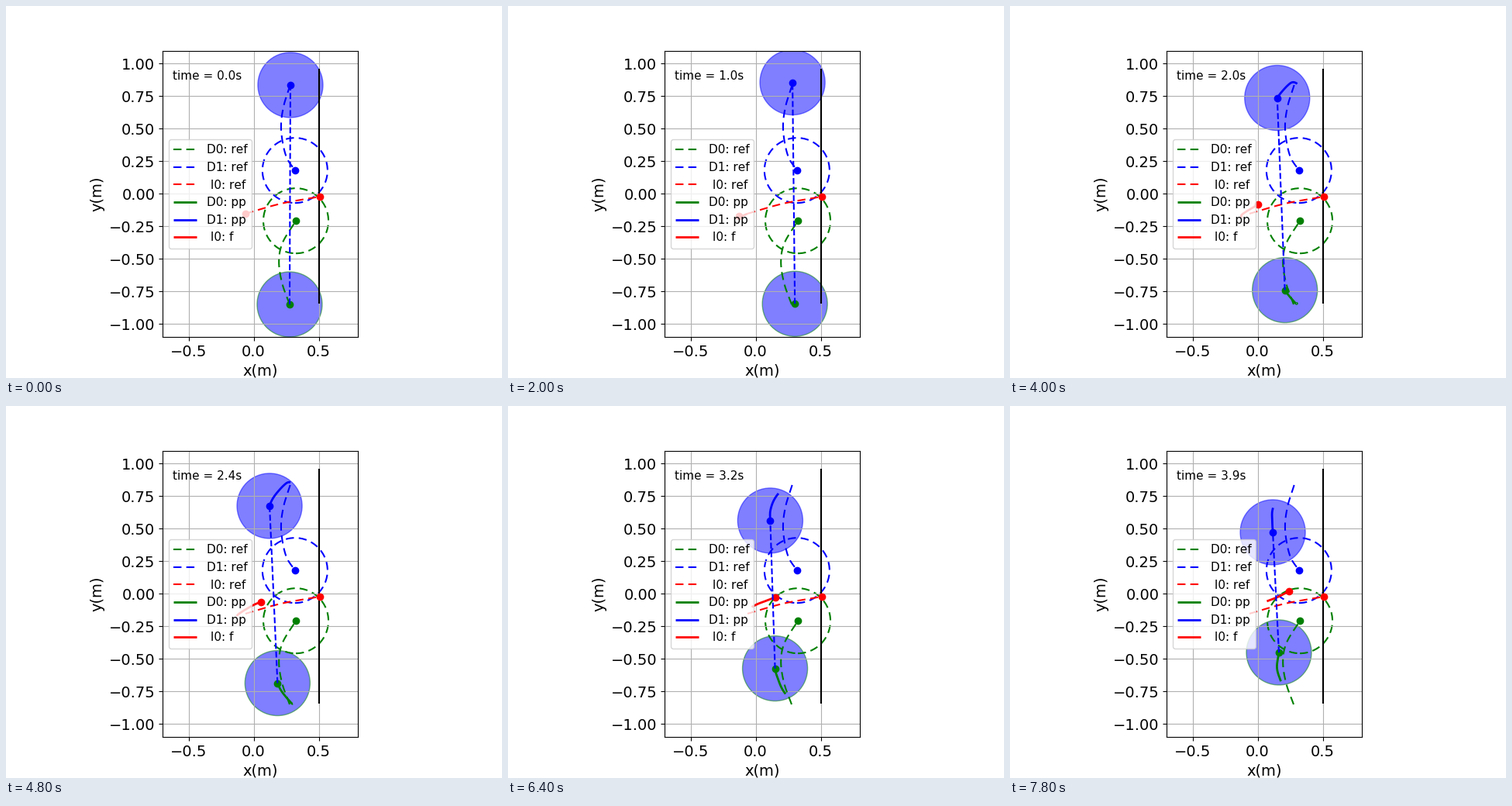
Write a matplotlib script that moves like this. It is 640 px wide and 480 px high and loops after 8 s.

```python
import numpy as np
import matplotlib.pyplot as plt
from matplotlib.animation import FuncAnimation
from matplotlib.patches import Circle

FRAMES, STEP, TAIL, RADIUS = 40, 0.1, 14, 0.25
DASH = (0, (5, 3))


def curve(points, n=80):
    """Smooth curve through evenly timed points, sampled n times."""
    pts = np.array(points)
    slope = np.gradient(pts, axis=0)
    t = np.linspace(0, len(pts) - 1, n)
    k = np.minimum(t.astype(int), len(pts) - 2)
    u = (t - k)[:, None]
    xy = ((1 + 2 * u) * (1 - u) ** 2 * pts[k] + u * (1 - u) ** 2 * slope[k]
          + u * u * (3 - 2 * u) * pts[k + 1] + u * u * (u - 1) * slope[k + 1])
    return xy.T


colors = ["green", "blue", "red"]
names = ["D0", "D1", " I0"]
refs = [
    [(.276, -.849), (.218, -.685), (.194, -.52), (.222, -.375), (.324, -.207)],
    [(.280, .836), (.227, .66), (.211, .49), (.247, .295), (.317, .180)],
    [(-.063, -.152), (.21, -.075), (.508, -.021)],
]
tracks = [curve(points, FRAMES) for points in (
    [(.276, -.849), (.301, -.840), (.289, -.838), (.213, -.746),
     (.173, -.658), (.148, -.565), (.163, -.450)],
    [(.282, .836), (.303, .846), (.252, .851), (.155, .745),
     (.114, .646), (.112, .556), (.116, .473)],
    [(-.063, -.152), (-.118, -.176), (-.116, -.155), (-.004, -.087),
     (.083, -.052), (.159, -.022), (.240, .020)],
)]

plt.rcParams.update({"font.family": "DejaVu Sans", "axes.labelsize": 14,
                     "xtick.labelsize": 14, "ytick.labelsize": 14,
                     "lines.solid_capstyle": "butt", "text.kerning_factor": 6})
fig, ax = plt.subplots(figsize=(6.4, 4.8), dpi=100)
ax.set_aspect("equal")
ax.set(xlim=(-0.7, 0.8), ylim=(-1.1, 1.1), xlabel="x(m)", ylabel="y(m)")
ax.set_xticks(np.arange(-0.5, 0.6, 0.5))
ax.set_yticks(np.arange(-1, 1.01, 0.25))
ax.grid(True)

ax.plot([0.5, 0.5], [-0.84, 0.96], color="black", lw=1.5)
for ref, color, name in zip(refs, colors, names):
    ax.plot(*curve(ref), color=color, lw=1.5, ls=DASH, label=name + ": ref")
    ax.plot(*ref[-1], "o", color=color)

discs = []
for ref, color in zip(refs[:2], colors):
    disc = Circle((0, 0), RADIUS, fc="blue", ec=color, alpha=0.5)
    discs.append(ax.add_patch(disc))
    ax.add_patch(Circle(ref[-1], RADIUS, fill=False, ec=color, lw=1.5, ls=DASH))

trails = [ax.plot([], [], color=c, lw=2, label=f"{n}: {kind}")[0]
          for c, n, kind in zip(colors, names, ["pp", "pp", "f"])]
dots = [ax.plot([], [], "o", color=c)[0] for c in colors]
link, = ax.plot([], [], "--", color="blue", lw=1.5)
clock = ax.text(0.05, 0.9, "", transform=ax.transAxes, fontsize=11)
ax.legend(loc="center left", fontsize=11)


def update(i):
    for track, trail, dot in zip(tracks, trails, dots):
        trail.set_data(track[:, max(0, i - TAIL):i + 1])
        dot.set_data(track[:, i:i + 1])
    for track, disc in zip(tracks, discs):
        disc.center = track[:, i]
    link.set_data(np.transpose([track[:, i] for track in tracks[:2]]))
    clock.set_text(f"time = {i * STEP:.1f}s")
    return [*trails, *dots, *discs, link, clock]


anim = FuncAnimation(fig, update, frames=FRAMES, interval=200,
                     repeat=True, repeat_delay=0, blit=False)
plt.show()
```
